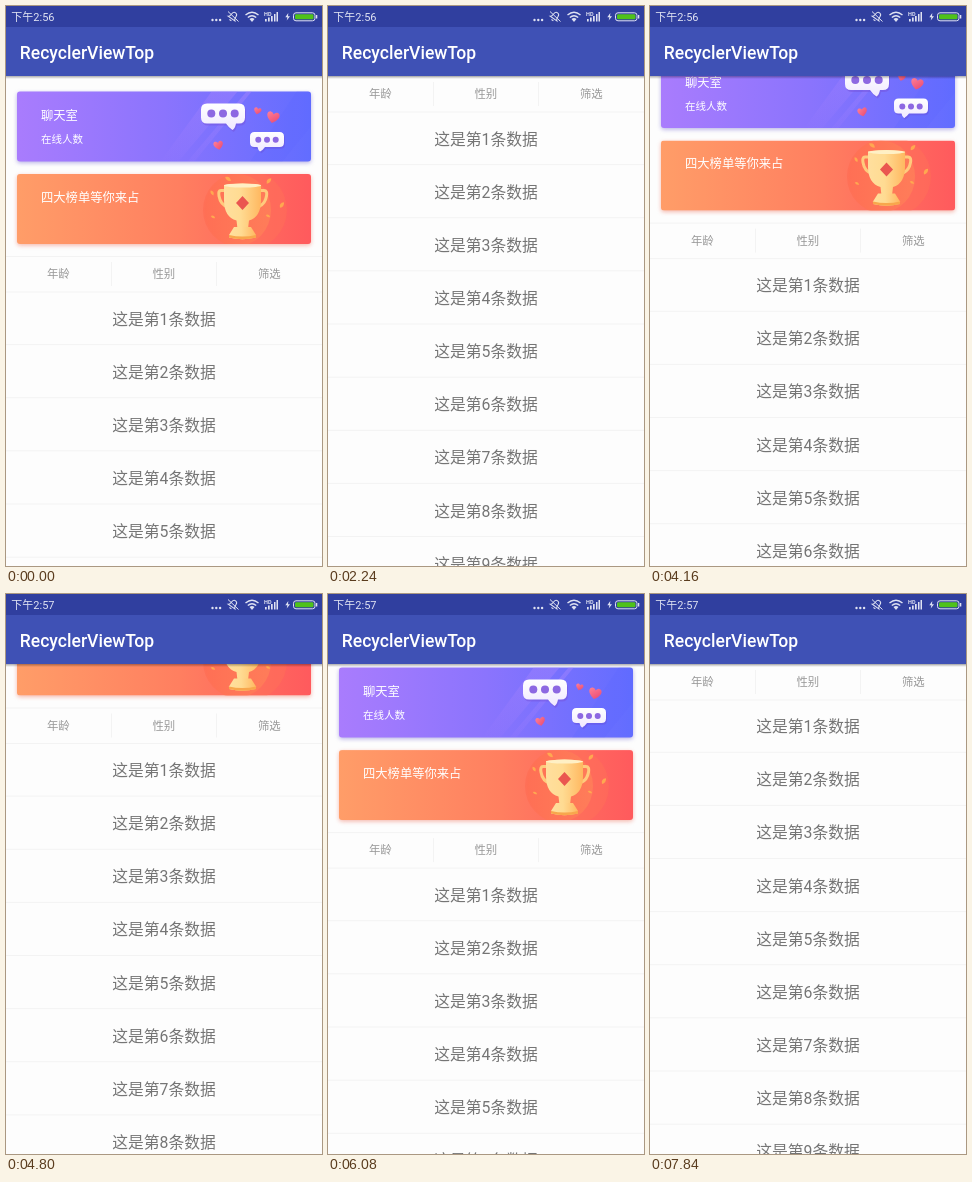
An HTML page that plays this animation: 316x560 px, repeating every 8000 ms.

```html
<!DOCTYPE html>
<html lang="zh-CN">
<head>
<meta charset="utf-8">
<title>RecyclerViewTop</title>
<style>
html, body { margin: 0; width: 100%; height: 100%; overflow: hidden; background: #fdfdfd; }
svg { display: block; width: 316px; height: 560px; }
text { font-family: Roboto, "Noto Sans CJK SC", "Noto Sans CJK", sans-serif; }
.mid { text-anchor: middle; }
.row { font-size: 15.8px; fill: #757575; }
.tab { font-size: 11.4px; fill: #999; }
.rule { stroke: #f3f3f3; }
</style>
</head>
<body>
<svg viewBox="0 0 316 560">
  <defs>
    <linearGradient id="violet"><stop stop-color="#a97cfd"/><stop offset=".5" stop-color="#8b74fd"/><stop offset="1" stop-color="#626dff"/></linearGradient>
    <linearGradient id="coral"><stop stop-color="#ff9d68"/><stop offset=".55" stop-color="#ff7f60"/><stop offset="1" stop-color="#ff5a5d"/></linearGradient>
    <linearGradient id="streak" x1="0" y1="1" x2="1" y2="0"><stop stop-color="#c58cff" stop-opacity="0"/><stop offset="1" stop-color="#b58cff" stop-opacity=".35"/></linearGradient>
    <linearGradient id="gold"><stop stop-color="#ffdf9e"/><stop offset=".45" stop-color="#ffdb92"/><stop offset="1" stop-color="#ffb860"/></linearGradient>
    <linearGradient id="disc"><stop stop-color="#ff6a50" stop-opacity=".6"/><stop offset="1" stop-color="#ff8a58" stop-opacity=".55"/></linearGradient>
    <linearGradient id="bubble" x2="0" y2="1"><stop stop-color="#fff"/><stop offset="1" stop-color="#efe8ff"/></linearGradient>
    <linearGradient id="heartFill" x2="1" y2="1"><stop stop-color="#ff8097"/><stop offset="1" stop-color="#e8466f"/></linearGradient>
    <linearGradient id="shade" x2="0" y2="1"><stop stop-opacity=".32"/><stop offset="1" stop-opacity="0"/></linearGradient>
    <filter id="blur" x="-10%" y="-20%" width="120%" height="150%"><feGaussianBlur stdDeviation="2"/></filter>
    <clipPath id="card1"><rect x="11" y="85.5" width="294" height="70" rx="3"/></clipPath>
    <clipPath id="card2"><rect x="11" y="168" width="294" height="70" rx="3"/></clipPath>
    <path id="heart" d="M0 5C-8 0-6-5-3-5Q-1-5 0-3Q1-5 3-5C6-5 8 0 0 5Z" fill="url(#heartFill)"/>
    <path id="leaf" d="M-3.5 0Q0-4 3.5 0Q0 3 -3.5 0Z" fill="#ffa850"/>
    <path id="talk" d="M6 0H38Q44 0 44 6V14Q44 20 38 20H35Q34 25 31.5 26.5Q28 24.5 25 20H6Q0 20 0 14V6Q0 0 6 0Z"/>
    <path id="chat" d="M4.5 0H29.5Q34 0 34 4.5V10.5Q34 15 29.5 15H15Q12.5 18.5 10 19.5Q8 18 7.5 15H4.5Q0 15 0 10.5V4.5Q0 0 4.5 0Z"/>
  </defs>

  <g id="page">
    <rect x="11" y="87" width="294" height="70" rx="3" fill="#8a80d8" opacity=".6" filter="url(#blur)"/>
    <g clip-path="url(#card1)">
      <rect x="11" y="85" width="294" height="71" fill="url(#violet)"/>
      <path d="M154 156L206 85H232L172 156ZM181 156L241 85H246L188 156Z" fill="url(#streak)"/>
      <path d="M244 156L291 85H305V120L276 156Z" fill="#5965ff" opacity=".2"/>
      <use href="#talk" x="196" y="99.5" fill="#7657df" opacity=".55"/>
      <use href="#talk" x="195" y="97.5" fill="url(#bubble)"/>
      <g fill="#8d68e2"><circle cx="205.3" cy="107.5" r="4"/><circle cx="217" cy="107.5" r="4"/><circle cx="228.7" cy="107.5" r="4"/></g>
      <use href="#chat" x="245" y="127.7" fill="#6653df" opacity=".5"/>
      <use href="#chat" x="244" y="126" fill="url(#bubble)"/>
      <g fill="#8d68e2"><circle cx="252.3" cy="133.8" r="3"/><circle cx="261" cy="133.8" r="3"/><circle cx="269.7" cy="133.8" r="3"/></g>
      <use href="#heart" transform="translate(267 111.5) rotate(12) scale(1.1)"/>
      <use href="#heart" transform="translate(251.5 105) rotate(15) scale(.65)"/>
      <use href="#heart" transform="translate(212.5 139.5) rotate(-12) scale(.85)"/>
    </g>
    <text x="35" y="114.3" font-size="12.3" fill="#fff">聊天室</text>
    <text x="35" y="137.2" font-size="10.5" fill="#fff">在线人数</text>

    <rect x="11" y="169.5" width="294" height="70" rx="3" fill="#ef8a78" opacity=".6" filter="url(#blur)"/>
    <g clip-path="url(#card2)">
      <rect x="11" y="168" width="294" height="70" fill="url(#coral)"/>
      <ellipse cx="240" cy="204" rx="41" ry="40" fill="#ff7355" opacity=".4"/>
      <ellipse cx="231" cy="204" rx="34" ry="36" fill="url(#disc)"/>
      <g fill="none" stroke="#ffcb7d" stroke-width="3"><path d="M219 184.5H215Q212 184.5 213 190Q214.5 199 222 201"/><path d="M254 184.5H258Q261.5 184.5 260.5 190Q259 199 251 201"/></g>
      <path d="M218 179Q236.5 176 255 179V194Q255 211 243 214.5L242 223H231.5L230.5 214.5Q218 211 218 194Z" fill="url(#gold)"/>
      <ellipse cx="236.5" cy="179.5" rx="18.5" ry="2" fill="#fff0c5"/>
      <path d="M228 221H245L250 229V231.5Q236.5 235 223 231.5V229Z" fill="url(#gold)"/>
      <path d="M223 229Q236.5 232 250 229V231.5Q236.5 235 223 231.5Z" fill="#f8a74c"/>
      <path d="M236.5 190L243 197L236.5 204L230 197Z" fill="#ea5650"/>
      <use href="#leaf" transform="translate(222 173) rotate(35)"/>
      <use href="#leaf" transform="translate(206 187) rotate(60) scale(.8)"/>
      <use href="#leaf" transform="translate(263 175) rotate(-50)"/>
      <use href="#leaf" transform="translate(276 199) rotate(-55)"/>
      <use href="#leaf" transform="translate(262 210) rotate(25) scale(.7)"/>
      <use href="#leaf" transform="translate(207 211) rotate(25) scale(.7)"/>
    </g>
    <text x="35" y="195.8" font-size="12.3" fill="#fff">四大榜单等你来占</text>
    <g id="rows"></g>
  </g>

  <g id="tabs">
    <rect y="250" width="316" height="36" fill="#fdfdfd"/>
    <path class="rule" d="M0 250.5H316M0 286H316M105.5 256V280M210.5 256V280"/>
    <text class="tab mid" x="52.3" y="272.3">年龄</text>
    <text class="tab mid" x="157.8" y="272.3">性别</text>
    <text class="tab mid" x="263.3" y="272.3">筛选</text>
  </g>

  <rect y="70" width="316" height="3" fill="url(#shade)"/>
  <rect width="316" height="70" fill="#3f51b5"/>
  <rect width="316" height="21" fill="#303f9f"/>
  <text x="13.8" y="52.8" font-size="17.56" font-weight="500" fill="#fff">RecyclerViewTop</text>

  <g fill="#dfe2f2">
    <text id="clock" x="5.3" y="15.2" font-size="11"></text>
    <circle cx="206.5" cy="14" r="1.2"/><circle cx="210.3" cy="14" r="1.2"/><circle cx="214.1" cy="14" r="1.2"/>
    <g fill="none" stroke="#dfe2f2">
      <path transform="rotate(35 227 10.5)" d="M223 13Q224.5 12 224.5 9Q224.5 6 227 6Q229.5 6 229.5 9Q229.5 12 231 13ZM225.8 15H228.2"/>
      <path d="M222 5.5L232.5 15.5"/>
      <path d="M239.5 9Q246 3.5 252.5 9M241.8 11.5Q246 8 250.2 11.5" stroke-width="1.4"/>
    </g>
    <path d="M243.5 13Q246 11 248.5 13L246 16Z"/>
    <text x="258" y="9.5" font-size="5.5" font-weight="700">HD</text>
    <path d="M259 13h1.7v2.5h-1.7zM262 11.5h1.7v4h-1.7zM265 10h1.7v5.5h-1.7zM268 8h1.5v7.5h-1.5zM270.5 6h1.5v9.5h-1.5z"/>
    <path d="M282.3 7L279.3 11.2H281.4L280.7 14.5L284 10.2H282Z"/>
    <rect x="287.5" y="6.8" width="21.5" height="8" rx="2.5" fill="none" stroke="#dfe2f2"/>
    <rect x="289" y="8.3" width="18.5" height="5" rx="1.2" fill="#4fc21b"/>
    <path d="M310 9h1.3v3.6h-1.3z"/>
  </g>
</svg>
<script>
const LOOP = 8000, PIN = 180, ROW = 53.13;
const $ = id => document.getElementById(id);
const page = $('page'), tabs = $('tabs'), clock = $('clock');

const smooth = p => p * p * (3 - 2 * p);
const easeOut = p => 1 - (1 - p) ** 2;

// [time, scroll offset, easing towards it]
const steps = [
  [0, 0], [1200, 0], [2160, 180, smooth], [3120, 180], [4120, 33.4, smooth],
  [4240, 33.4], [5300, 223, smooth], [5440, 223], [6080, 12, smooth],
  [6300, 0, easeOut], [6480, 0], [7440, 180.4, smooth], [LOOP, 180.4]
];

let rows = '';
for (let n = 1; n <= 11; n++) {
  const y = 286 + ROW * (n - 1);
  rows += `<text class="row mid" x="158" y="${y + 32.6}">这是第${n}条数据</text>` +
          `<path class="rule" d="M0 ${y + ROW - .5}H316"/>`;
}
$('rows').innerHTML = rows;

function scrollAt(t) {
  const i = steps.findIndex(s => s[0] > t);
  const [t0, a] = steps[i - 1], [t1, b, ease = smooth] = steps[i];
  return a + (b - a) * ease((t - t0) / (t1 - t0));
}

function draw(now) {
  const t = now % LOOP, y = scrollAt(t);
  page.setAttribute('transform', `translate(0 ${-y})`);
  tabs.setAttribute('transform', `translate(0 ${-Math.min(y, PIN)})`);
  clock.textContent = t < 4800 ? '下午2:56' : '下午2:57';
}

const start = performance.now();
function tick() {
  draw(performance.now() - start);
  requestAnimationFrame(tick);
}
tick();
</script>
</body>
</html>
```
